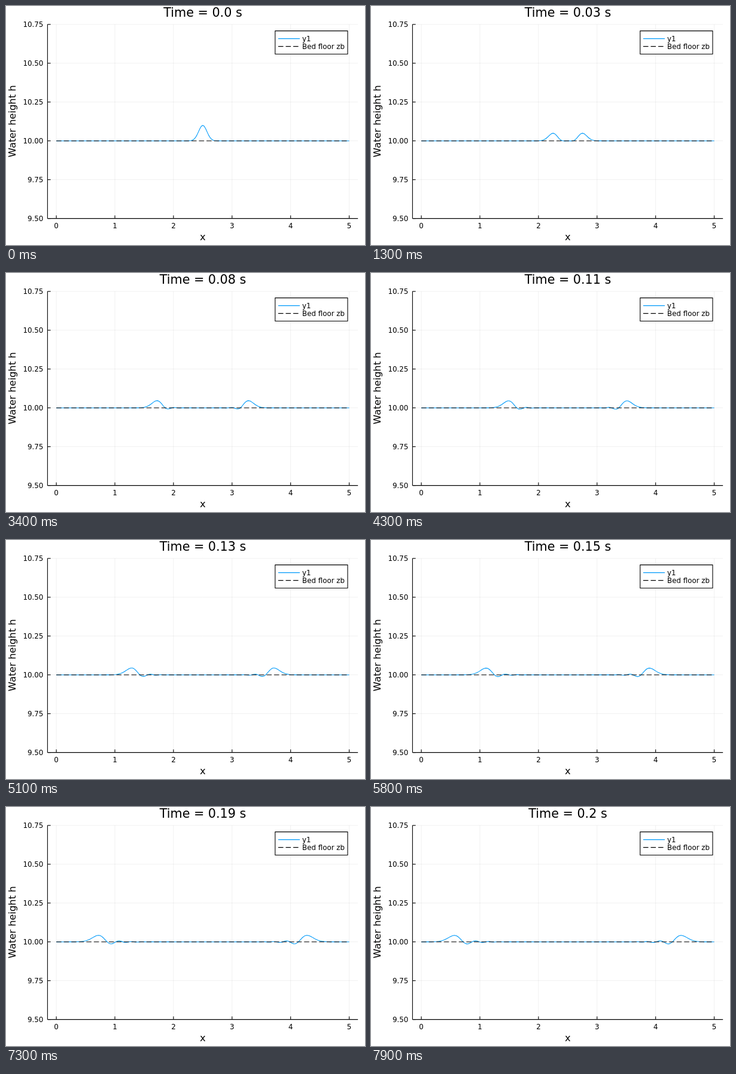
An HTML page with a canvas for the animation above (8000 ms loop, 600 by 400 pixels).

```html
<!DOCTYPE html>
<html lang="en">
<head>
<meta charset="utf-8">
<title>Water height</title>
<style>
  html, body { margin: 0; width: 100%; height: 100%; overflow: hidden; background: #fff; }
  canvas { display: block; width: 600px; height: 400px; }
</style>
</head>
<body>
<canvas id="stage" width="600" height="400"></canvas>
<script>
const LOOP = 8000, FRAME = 100, HOLD = 2;
const G = 9.81, N = 201, DX = 5 / (N - 1);
const DT = 0.00264, FIRST = 0.1 * DT;
const BOX = { left: 69.4, right: 588.2, top: 30.8, bottom: 355.6 };
const BLUE = '#009afa';

const ctx = document.getElementById('stage').getContext('2d');
const px = x => 84.1 + x * 97.9;
const py = h => BOX.bottom - (h - 9.5) * 259.84;

// Shallow water equations: central differences in space, RK4 in time.
function slope({ h, q }) {
  const dh = new Float64Array(N), dq = new Float64Array(N);
  const flux = i => q[i] * q[i] / h[i] + G * h[i] * h[i] / 2;
  for (let i = 1; i < N - 1; i++) {
    dh[i] = (q[i - 1] - q[i + 1]) / (2 * DX);
    dq[i] = (flux(i - 1) - flux(i + 1)) / (2 * DX);
  }
  return { h: dh, q: dq };
}

const add = (s, d, dt) => ({
  h: s.h.map((v, i) => v + dt * d.h[i]),
  q: s.q.map((v, i) => v + dt * d.q[i])
});

function advance(s, dt) {
  const a = slope(s);
  const b = slope(add(s, a, dt / 2));
  const c = slope(add(s, b, dt / 2));
  const d = slope(add(s, c, dt));
  return [a, b, b, c, c, d].reduce((sum, k) => add(sum, k, dt / 6), s);
}

function simulate() {
  let state = {
    h: Float64Array.from({ length: N }, (_, i) => 10 + 0.1 * Math.exp(-100 * (i * DX - 2.5) ** 2)),
    q: new Float64Array(N)
  };
  let time = 0;
  const shots = [{ time, h: state.h }];
  for (let n = 1; n < LOOP / FRAME - HOLD; n++) {
    const dt = n === 1 ? FIRST : DT;
    state = advance(state, dt);
    time += dt;
    shots.push({ time, h: state.h });
  }
  return shots;
}

function line(x1, y1, x2, y2, color = '#000', width = 1.1, dash = []) {
  ctx.strokeStyle = color;
  ctx.lineWidth = width;
  ctx.setLineDash(dash);
  ctx.beginPath();
  ctx.moveTo(x1, y1);
  ctx.lineTo(x2, y2);
  ctx.stroke();
  ctx.setLineDash([]);
}

function text(str, x, y, size = 11.85, align = 'center') {
  ctx.font = `${size}px "DejaVu Sans", sans-serif`;
  ctx.textAlign = align;
  ctx.fillStyle = '#000';
  ctx.fillText(str, x, y);
}

const dashed = (x1, x2, y) => line(x1, y, x2, y, '#000', 1.1, [8.5, 4.05]);

function drawAxes() {
  const { left, right, top, bottom } = BOX;
  const xs = [0, 1, 2, 3, 4, 5], ys = [9.5, 9.75, 10, 10.25, 10.5, 10.75];
  const grid = 'rgba(0,0,0,0.1)';
  xs.forEach(v => line(px(v), top, px(v), bottom, grid, 0.6));
  ys.forEach(v => line(left, py(v), right, py(v), grid, 0.6));
  line(left, bottom, right, bottom);
  line(left, top, left, bottom);
  xs.forEach(v => {
    line(px(v), bottom, px(v), bottom - 5.2);
    text(String(v), px(v), 371.9);
  });
  ys.forEach(v => {
    line(left, py(v), left + 5.2, py(v));
    text(v.toFixed(2), 62.4, py(v) + 4.3, 11.85, 'right');
  });
  text('x', 328.8, 392, 16.3);
  ctx.save();
  ctx.translate(16.2, 192.8);
  ctx.rotate(-Math.PI / 2);
  text('Water height h', 0, 0, 16.3);
  ctx.restore();
}

function drawCurve(h) {
  ctx.strokeStyle = BLUE;
  ctx.lineWidth = 1.1;
  ctx.lineJoin = 'round';
  ctx.beginPath();
  h.forEach((v, i) => ctx.lineTo(px(i * DX), py(v)));
  ctx.stroke();
  dashed(px(0), px(5), py(10));
}

function drawLegend() {
  ctx.fillStyle = '#fff';
  ctx.fillRect(449.8, 41.6, 121.2, 38.9);
  ctx.strokeStyle = '#000';
  ctx.lineWidth = 1.1;
  ctx.strokeRect(449.8, 41.6, 121.2, 38.9);
  line(455, 54.6, 491, 54.6, BLUE);
  dashed(455, 491, 67.6);
  text('y1', 495, 58.9, 11.85, 'left');
  text('Bed floor zb', 495, 71.9, 11.85, 'left');
}

function titleFor(time) {
  const value = Math.round(time * 100) / 100;
  return `Time = ${Number.isInteger(value) ? value.toFixed(1) : value} s`;
}

const shots = simulate();

function render(now) {
  const frame = Math.floor((now % LOOP) / FRAME);
  const shot = shots[Math.max(0, frame - HOLD)];
  ctx.fillStyle = '#fff';
  ctx.fillRect(0, 0, 600, 400);
  drawAxes();
  drawCurve(shot.h);
  drawLegend();
  text(titleFor(shot.time), 329, 18.2, 20.7);
}

let start = null;
function tick(now) {
  if (start === null) start = now;
  render(Math.max(0, now - start));
  requestAnimationFrame(tick);
}
render(0);
requestAnimationFrame(tick);
</script>
</body>
</html>
```
